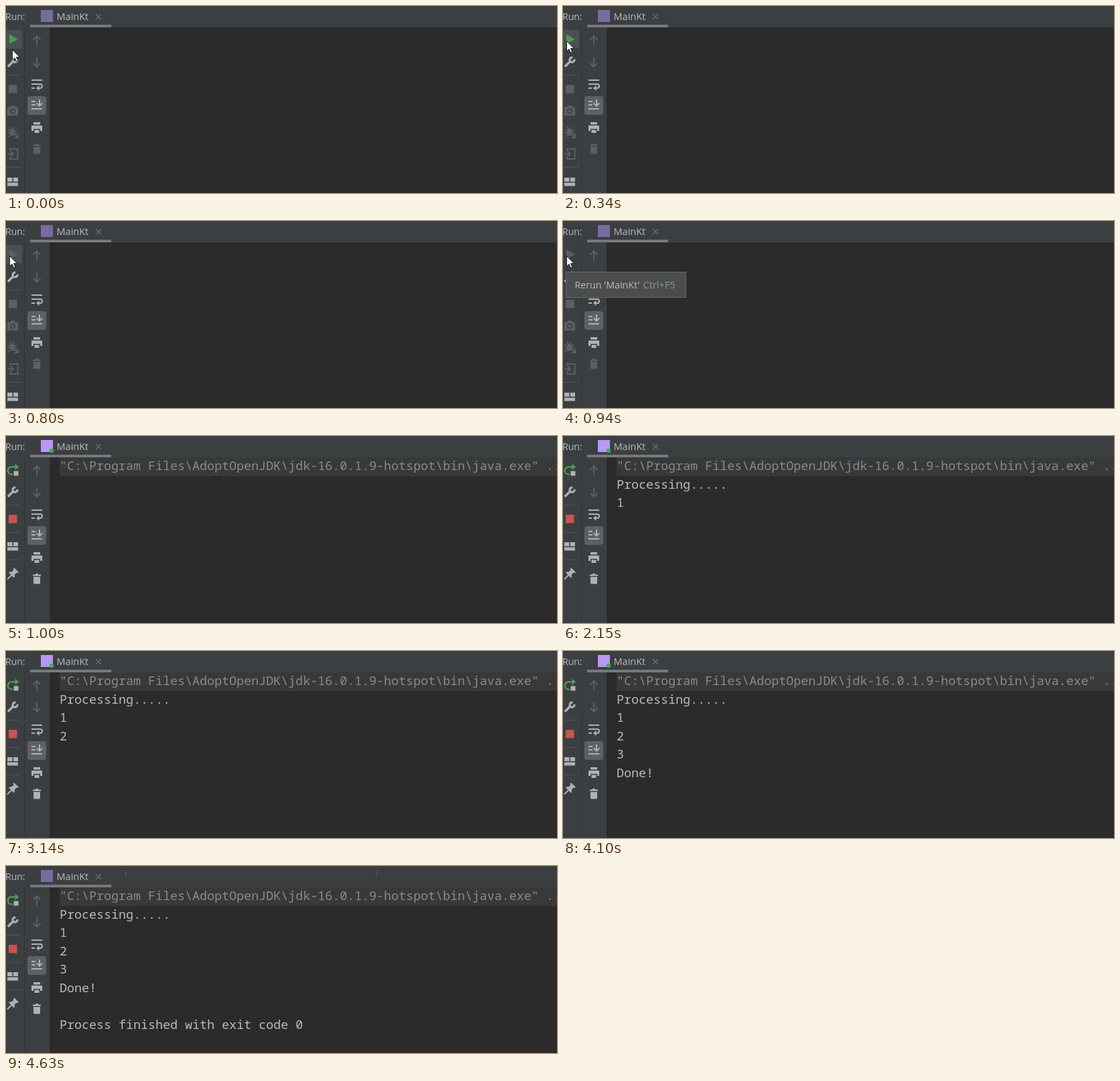
Write an HTML page that moves like this. It is 822 by 280 pixels and loops after 5.03 s.

```html
<!DOCTYPE html>
<html lang="en">
<head>
<meta charset="utf-8">
<title>Run console</title>
<style>
  html, body { margin: 0; width: 100%; height: 100%; overflow: hidden; background: #2b2b2b; }
  svg { display: block; width: 822px; height: 280px; }
  text { font: 14.5px "Open Sans", sans-serif; fill: #bbb; white-space: pre; }
  .console text { font: 18.33px "Noto Sans Mono", monospace; }
  .console .command { fill: #8a8a8a; }

  .light { fill: #afb1b3; }
  .dim { fill: #5d6062; }
  .line { fill: none; stroke-width: 2; }
  .line.light { stroke: #afb1b3; }
  .line.dim { stroke: #5d6062; }
  .rule { fill: none; stroke: #515456; }

  /* Hard switches on one shared 5030 ms clock */
  .idle, .hover, .ready, .disabled, .tip, .running, .active, .ended,
  .processing, .one, .two, .done, .exit, .pointer {
    animation: 5030ms step-end infinite;
  }
  .disabled, .tip, .running, .active, .ended, .processing, .one, .two, .done, .exit { opacity: 0; }
  .idle { animation-name: idle; }
  .hover { animation-name: hover; }
  .ready { animation-name: ready; }
  .disabled { animation-name: disabled; }
  .tip { animation-name: tip; }
  .running { animation-name: running; }
  .active { animation-name: active; }
  .ended { animation-name: ended; }
  .processing { animation-name: processing; }
  .one { animation-name: one; }
  .two { animation-name: two; }
  .done { animation-name: done; }
  .exit { animation-name: exit; }
  .pointer { animation-name: pointer; }

  @keyframes idle { 0% { opacity: 1 } 19.881%, 100% { opacity: 0 } }
  @keyframes hover { 0% { opacity: 1 } 18.688%, 100% { opacity: 0 } }
  @keyframes ready { 0% { opacity: 1 } 15.905%, 100% { opacity: 0 } }
  @keyframes disabled { 0% { opacity: 0 } 15.905% { opacity: 1 } 19.881%, 100% { opacity: 0 } }
  @keyframes tip { 0% { opacity: 0 } 18.688% { opacity: 1 } 19.881%, 100% { opacity: 0 } }
  @keyframes running { 0% { opacity: 0 } 19.881%, 100% { opacity: 1 } }
  @keyframes active { 0% { opacity: 0 } 19.881% { opacity: 1 } 88.072%, 100% { opacity: 0 } }
  @keyframes ended { 0% { opacity: 0 } 88.072%, 100% { opacity: 1 } }
  @keyframes processing { 0% { opacity: 0 } 21.272%, 100% { opacity: 1 } }
  @keyframes one { 0% { opacity: 0 } 42.744%, 100% { opacity: 1 } }
  @keyframes two { 0% { opacity: 0 } 62.425%, 100% { opacity: 1 } }
  @keyframes done { 0% { opacity: 0 } 81.511%, 100% { opacity: 1 } }
  @keyframes exit { 0% { opacity: 0 } 92.048%, 100% { opacity: 1 } }
  @keyframes pointer {
    0% { transform: translate(9px, 65px) }
    1.392% { transform: translate(8px, 61px) }
    3.181% { transform: translate(7px, 57px) }
    4.970% { transform: translate(6px, 54px) }
    6.759%, 100% { transform: translate(5px, 52px) }
  }
</style>
</head>
<body>
<svg viewBox="0 0 822 280">
  <defs>
    <g id="layout">
      <path class="light" d="M2 0h7.5v6H2zM11 0h7v6h-7zM2 7.5h16v5H2z"/>
    </g>
    <path id="trash" d="M44 206h4v1.5h4v2.2H40v-2.2h4zM41 211h10v9a1.5 1.5 0 0 1-1.5 1.5h-7a1.5 1.5 0 0 1-1.5-1.5z"/>
  </defs>

  <rect width="822" height="280" fill="#2b2b2b"/>
  <path d="M0 0h822v32H65v248H0z" fill="#3c3f41"/>
  <path d="M27.5 32v248" stroke="#323436"/>

  <!-- Header -->
  <text x="-1" y="21" style="font-size:14px">Run:</text>
  <rect x="52" y="6" width="18" height="18" fill="#786ba1"/>
  <g class="active">
    <rect x="52" y="6" width="18" height="18" fill="#b798f5"/>
    <circle cx="68" cy="22" r="3.2" fill="#3fae4c"/>
  </g>
  <text x="75.5" y="21">MainKt</text>
  <path d="M134 12l8 8m0-8l-8 8" stroke="#6e7274" stroke-width="1.2"/>
  <rect x="36" y="28" width="121" height="4" fill="#747a80"/>
  <path class="ended" d="M178.5 6v11M553.5 6v11" stroke="#85888a" stroke-dasharray="1 2"/>

  <!-- Run toolbar -->
  <path class="hover" d="M0 36h21a3 3 0 0 1 3 3v22a3 3 0 0 1-3 3H0z" fill="#4c5052"/>
  <g class="light">
    <path class="line light" style="stroke-width:3.4" d="M2.8 90.8l7.5-7.5"/>
    <path class="line light" style="stroke-width:3.2" d="M14.3 77.2a3.5 3.5 0 1 0 2.6 2.6"/>
  </g>
  <path class="rule" d="M0 103.5h22"/>

  <g class="idle">
    <path class="ready" d="M5 42.5l13 7.3-13 7z" fill="#499c54"/>
    <path class="disabled dim" d="M5 42.5l13 7.3-13 7z"/>
    <rect class="dim" x="4" y="118" width="12.5" height="12.5"/>
    <path class="dim" d="M2 151.5h4l1.5-2.5h5l1.5 2.5h4V164H2z"/>
    <circle cx="10" cy="157.3" r="4" fill="#3c3f41"/>
    <circle class="dim" cx="10" cy="157.3" r="2.4"/>
    <ellipse class="dim" cx="9.5" cy="189" rx="4" ry="5.6"/>
    <path class="line dim" style="stroke-width:1.6" d="M6 181l2 3m5-3l-2 3M2 185.5l5 1.5m10-1.5l-5 1.5M2 190h5m5 0h5M3 196l4-3"/>
    <path class="line dim" d="M11 190l7 7m0-5.5v5.5h-5.5"/>
    <path class="line dim" d="M6 217v-3h11.5v15H6v-3M2 221.5h8M7 217.5l4 4-4 4"/>
    <path class="rule" d="M0 241.5h22"/>
    <use href="#layout" y="257"/>
    <use href="#trash" class="dim"/>
  </g>

  <g class="running">
    <path d="M10 57.4H8.3a5.6 5.6 0 0 1 0-11.2H14" fill="none" stroke="#499c54" stroke-width="2.4"/>
    <path d="M13.5 41.2l5.7 5-5.7 5z" fill="#499c54"/>
    <rect class="light" x="11.5" y="52.5" width="7" height="7"/>
    <rect x="4" y="118" width="12.5" height="12.5" fill="#c75450"/>
    <path class="rule" d="M0 144.5h22M0 185.5h22"/>
    <use href="#layout" y="159"/>
    <path class="light" d="M12 197l7 7-1.7 1.3-1.5-.7-3 3.2.2 3.4-1.5 1-7.5-7.6 1-1.2 3.2.1 3.4-3.1-.8-1.4z"/>
    <path class="line light" d="M2 214.5l6-6"/>
    <use href="#trash" class="light"/>
  </g>

  <!-- Console toolbar -->
  <path class="line dim" d="M46 59V45.5M40.5 50.5l5.5-5.5 5.5 5.5M46 77v13.5M40.5 85.5L46 91l5.5-5.5"/>
  <path class="line light" d="M38 111h16M38 117h13a3 3 0 0 1 0 6h-3M38 123h5"/>
  <path class="light" d="M45 123l4.5-4v8z"/>
  <rect x="32" y="135" width="28" height="28" rx="4" fill="#5c6164"/>
  <path class="line light" d="M38 143h6M38 148h6M38 154h16M50 140v9M45.8 145.5l4.2 4.2 4.2-4.2"/>
  <path class="light" d="M41 174h10v3.5H41zM38 179h16v8h-3v-3H41v3h-3zM42.5 185.5h7v4.5h-7z"/>

  <!-- Output -->
  <g class="console">
    <g class="running">
      <rect x="80" y="32" width="742" height="28" fill="#393939"/>
      <text class="command" x="80" y="51">"C:\Program Files\AdoptOpenJDK\jdk-16.0.1.9-hotspot\bin\java.exe" ...</text>
    </g>
    <text class="processing" x="80" y="79">Processing.....</text>
    <text class="one" x="80" y="106">1</text>
    <text class="two" x="80" y="134">2</text>
    <g class="done">
      <text x="80" y="161">3</text>
      <text x="80" y="189">Done!</text>
    </g>
    <text class="exit" x="80" y="244">Process finished with exit code 0</text>
  </g>

  <g class="tip">
    <rect x="4.5" y="76.5" width="179" height="38" fill="#4b4d4d" stroke="#636569"/>
    <text x="17.5" y="101" style="font-size:14.2px">Rerun 'MainKt'</text>
    <text x="119.5" y="101" style="font-size:14.5px;fill:#8d9399">Ctrl+F5</text>
  </g>

  <g class="idle">
    <path class="pointer" d="M.5.5v15.3l3.5-3.4 2.4 5.5 2.4-1-2.4-5.3h5z" fill="#fff" stroke="#111" stroke-width=".9"/>
  </g>
</svg>
</body>
</html>
```
